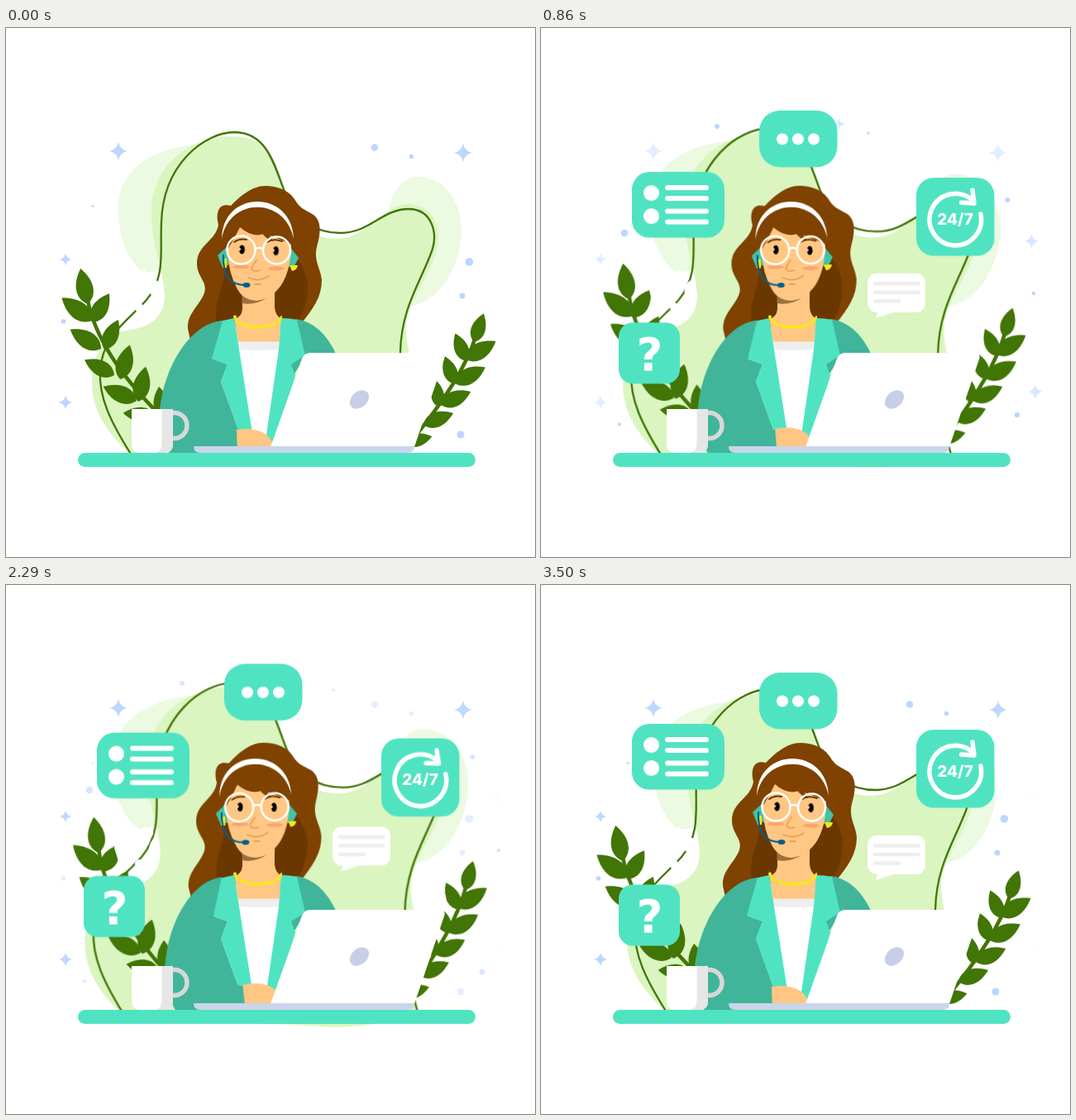
These frames come from a looping animation (640 by 640 pixels, 3.57 s). An HTML page without scripts:

```html
<!DOCTYPE html>
<html lang="en">
<head>
<meta charset="utf-8">
<title>Customer support</title>
<style>
  html, body { margin: 0; width: 100%; height: 100%; overflow: hidden; background: #fff; }
  svg { display: block; width: 100%; height: 100%; }
  text { font-family: Inter, "Open Sans", sans-serif; fill: #fff; text-anchor: middle; }
  .round { fill: none; stroke-linecap: round; stroke-linejoin: round; }
  .mint { fill: #50e3c2; }
  .jacket { fill: #40b59a; }
  .skin { fill: #ffc783; }
  .plant { fill: #417505; }
  .white { fill: #fff; }
  .stem { stroke: #417505; stroke-width: 4.5; }
  .blue { fill: #bbd6ff; }

  /* slow sway: one swing out and back per loop */
  .sway { animation: 1785ms cubic-bezier(.37, 0, .63, 1) infinite alternate; }
  .grow { animation-name: grow; transform-origin: 330px 330px; }
  .left { animation-name: left; transform-origin: 247px 519px; }
  .right { animation-name: right; transform-origin: 385px 548px; }
  .hair { animation-name: hair; transform-origin: 303px 325px; }
  .head { animation-name: head; transform-origin: 303px 350px; }
  .arm { animation-name: arm; transform-origin: 250px 370px; }
  .up { animation-name: up; }
  .down { animation-name: down; }
  @keyframes grow { to { transform: scale(1.046); } }
  @keyframes left { to { transform: rotate(4.8deg); } }
  @keyframes right { to { transform: rotate(-4.3deg); } }
  @keyframes hair { to { transform: rotate(-1.6deg); } }
  @keyframes head { to { transform: rotate(-2deg); } }
  @keyframes arm { to { transform: rotate(-4.6deg); } }
  @keyframes up { to { transform: translateY(-13px); } }
  @keyframes down { to { transform: translateY(13px); } }

  .twinkle { animation: fade 595ms cubic-bezier(.37, 0, .63, 1) infinite alternate; }
  .dots { animation: fade 892.5ms cubic-bezier(.37, 0, .63, 1) infinite alternate; }
  .late { animation-direction: alternate-reverse; }
  @keyframes fade { from { opacity: 1; } to { opacity: 0; } }

  /* cards pop in one after another and vanish when the loop restarts */
  .pop { animation: 3570ms ease-out infinite; }
  .note { animation-name: note; transform-origin: 408px 352px; }
  .hours { animation-name: hours; transform-origin: 454px 270px; }
  .list { animation-name: list; transform-origin: 222px 247px; }
  .chat { animation-name: chat; transform-origin: 311px 175px; }
  .ask { animation-name: ask; transform-origin: 168px 363px; }
  @keyframes note { 0% { transform: scale(0); } 15.4%, 100% { transform: none; } }
  @keyframes hours { 0%, 3.6% { transform: scale(0); } 19%, 100% { transform: none; } }
  @keyframes list { 0%, 6.3% { transform: scale(0); } 21.7%, 100% { transform: none; } }
  @keyframes chat { 0%, 6.7% { transform: scale(0); } 22.1%, 100% { transform: none; } }
  @keyframes ask { 0%, 8.7% { transform: scale(0); } 24.1%, 100% { transform: none; } }

  .spin { animation: spin 3570ms cubic-bezier(.37, 0, .63, 1) infinite; transform-origin: 501px 224.5px; }
  @keyframes spin { 0%, 33.6% { transform: rotate(0); } 65.5%, 100% { transform: rotate(360deg); } }

  .wag {
    font-family: "DejaVu Sans", sans-serif;
    animation: wag 3570ms ease-in-out infinite;
    transform-origin: 131px 400px;
  }
  @keyframes wag {
    0%, 30% { transform: rotate(0); }
    34% { transform: rotate(7deg); }
    39% { transform: rotate(-7deg); }
    45%, 100% { transform: rotate(0); }
  }

  .hop { animation: hop 3570ms ease-in-out infinite; }
  .hop:nth-of-type(2) { animation-delay: 200ms; }
  .hop:nth-of-type(3) { animation-delay: 400ms; }
  @keyframes hop {
    0%, 31.1%, 42.3%, 70.3%, 81.5%, 100% { transform: none; }
    36.7%, 75.9% { transform: translateY(-13px); }
  }

  .eye { animation: blink 3570ms linear infinite; transform-box: fill-box; transform-origin: center; }
  @keyframes blink {
    0%, 46%, 51.5%, 100% { transform: none; }
    49.3% { transform: scaleY(.15); }
  }
</style>
</head>
<body>
<svg viewBox="0 0 640 640" xmlns="http://www.w3.org/2000/svg">
  <defs>
    <path id="leaf" d="M0 0C-14 -9 -13.500 -27 0 -44C13.500 -27 14 -9 0 0Z"/>
    <path id="star" d="M0 -11Q1.8 -1.8 11 0Q1.8 1.8 0 11Q-1.8 1.8 -11 0Q-1.8 -1.8 0 -11Z"/>
    <g id="pupil">
      <ellipse rx="3.4" ry="5.6"/>
      <circle class="skin" cx="-3.4" cy="-.6" r="2"/>
    </g>
  </defs>

  <g class="blue">
    <g class="twinkle">
      <use href="#star" x="136" y="149"/>
      <use href="#star" x="553" y="151"/>
      <use href="#star" transform="translate(72 280) scale(.65)"/>
      <use href="#star" transform="translate(72 453) scale(.75)"/>
    </g>
    <g class="twinkle late">
      <use href="#star" transform="translate(360.5 116) scale(.65)"/>
      <use href="#star" transform="translate(593.5 258) scale(.8)"/>
      <use href="#star" transform="translate(598 440) scale(.8)"/>
    </g>
  </g>

  <!-- backdrop -->
  <g class="sway grow">
    <g fill="#ebfae0">
      <path d="M255 140C190 138 136 165 136 216C136 256 147 280 166 296L230 290Z"/>
      <path d="M463 218C468 195 482 180 499 180C532 181 551 212 551 245C550 290 522 334 488 336L470 260Z"/>
    </g>
    <path fill="#daf5c0" d="M156 520C120 490 104 460 104 430C104 392 122 370 145 366C174 363 192 350 192 323C190 290 176 265 176 222C177 160 230 131 272 131C318 131 326 160 340 203C352 240 370 255 400 255C440 254 455 213 487 213C516 214 527 240 522 265C515 298 486 330 484 362C484 380 488 390 490 410L490 506C460 528 400 529 370 526C300 523 250 520 156 520Z"/>
    <path class="round" stroke="#417505" stroke-width="2.3" d="M154 520C125 475 112 445 114 415C116 372 148 354 170 329C194 300 186 270 188 235C190 165 240 126 277 126C318 127 325 169 339 203C353 235 375 248 405 248C440 248 455 219 487 219C515 219 524 248 514 273C500 310 478 340 477 393C476 430 480 470 492 510"/>
  </g>

  <g class="blue">
    <g class="dots">
      <circle cx="446" cy="144.5" r="4.3"/>
      <circle cx="490.5" cy="155.5" r="2.8"/>
      <circle cx="560.5" cy="283" r="4.8"/>
      <circle cx="552" cy="324" r="3.5"/>
      <circle cx="550" cy="492" r="4.5"/>
      <circle cx="105" cy="215.5" r="1.6"/>
      <circle cx="69.5" cy="355" r="2.8"/>
    </g>
    <g class="dots late">
      <circle cx="213" cy="119" r="3"/>
      <circle cx="101" cy="248" r="4.3"/>
      <circle cx="396" cy="127" r="1.7"/>
      <circle cx="564.5" cy="208" r="2.9"/>
      <circle cx="596" cy="321" r="2.3"/>
      <circle cx="576" cy="468" r="3.2"/>
      <circle cx="95" cy="479.5" r="2"/>
    </g>
  </g>

  <!-- plants -->
  <g class="sway left plant">
    <path class="round stem" d="M99 330Q112 395 188 470"/>
    <use href="#leaf" transform="translate(99 334) rotate(-11.5)"/>
    <use href="#leaf" transform="translate(104 354) rotate(-53) scale(1.04)"/>
    <use href="#leaf" transform="translate(115 388) rotate(-58)"/>
    <use href="#leaf" transform="translate(131 420) rotate(-63) scale(.92)"/>
    <use href="#leaf" transform="translate(158 451) rotate(-67)"/>
    <use href="#leaf" transform="translate(181 470) rotate(-84) scale(.9)"/>
    <use href="#leaf" transform="translate(104 356) rotate(31) scale(.92)"/>
    <use href="#leaf" transform="translate(119 389) rotate(25) scale(.9)"/>
    <use href="#leaf" transform="translate(138 425) rotate(16) scale(.98)"/>
    <use href="#leaf" transform="translate(160 452) rotate(12) scale(.98)"/>
    <use href="#leaf" transform="translate(189 471) rotate(-6) scale(.85)"/>
  </g>
  <g class="sway right plant">
    <path class="round stem" d="M568 374Q552 425 490 500"/>
    <use href="#leaf" transform="translate(566 380) rotate(19) scale(.83)"/>
    <use href="#leaf" transform="translate(556 401) rotate(59) scale(.97)"/>
    <use href="#leaf" transform="translate(543 430) rotate(62) scale(.95)"/>
    <use href="#leaf" transform="translate(526 456) rotate(66) scale(.9)"/>
    <use href="#leaf" transform="translate(505 480) rotate(69) scale(.88)"/>
    <use href="#leaf" transform="translate(482 502) rotate(77) scale(.78)"/>
    <use href="#leaf" transform="translate(557 403) rotate(-22) scale(.82)"/>
    <use href="#leaf" transform="translate(543 431) rotate(-20) scale(.82)"/>
    <use href="#leaf" transform="translate(524 459) rotate(-7) scale(.76)"/>
  </g>
  <g class="white">
    <path d="M131 318Q138 297 152 296L157 290L162 297L169 291L168 302Q160 322 150 342Q134 346 135 331Z"/>
    <ellipse cx="179" cy="314" rx="4.5" ry="9" transform="rotate(25 179 314)"/>
    <ellipse cx="161" cy="338" rx="5" ry="6"/>
    <circle cx="174" cy="300" r="4"/>
    <path d="M513 395Q514 372 528 361Q533 366 530 372Q535 378 530 395Z"/>
  </g>

  <!-- woman -->
  <g class="sway hair">
    <path fill="#7f4200" d="M272 215C258 211 253 222 257 238C254 258 231 262 231 285C231 302 246 308 239 323C232 338 219 346 220 364L224 382L290 356L335 356L355 360C372 340 382 325 382 305C381 291 372 282 376 265C381 248 382 234 372 226C361 219 356 219 349 207C340 194 325 191 314 191C297 191 283 204 272 215Z"/>
    <path fill="#6b3700" d="M264 285C268 310 250 325 255 358H290V300ZM352 280C370 300 367 330 355 352L320 356L330 300Z"/>
  </g>
  <path class="skin" d="M286 310V340Q285 350 276 352L282 384H330L334 352Q326 349 325 338V310Z"/>
  <path fill="#99703f" d="M285.5 321Q300 332 315 327Q300 336 285.5 333Z"/>
  <path class="jacket" d="M350 352Q382 356 400 396L360 400L330 450L340 400Z"/>
  <path class="white" d="M279 380H332L314 507H298Z"/>
  <path fill="#eee" d="M279 379.5H331.5L330.5 389Q306 391 282 389Z"/>
  <path class="jacket" d="M258 355L249 400L268 407L260 428L281 486V513H215V400Z"/>
  <path class="mint" d="M276 351L258 355L249 400L268 407L260 428L281 486L298 490L282 389ZM333 351Q343 351 352 353L362 396L345 407L350 420L330 506H313L330 389Z"/>
  <path class="round" stroke="#f8e71c" stroke-width="4" stroke-dasharray=".1 4" d="M277 349.5C281 366 329 366 333 349.5"/>
  <path class="round" stroke="#f8e71c" stroke-width="2.5" d="M277 349.5C281 366 329 366 333 349.5"/>
  <g class="sway arm">
    <path class="skin" d="M276 487Q296 482 312 490Q322 496 324 507V513H278Z"/>
    <path class="jacket" d="M262 354C222 357 190 412 186 465Q188 500 198 515H280L279 487L272 486L256 435L249 400Z"/>
  </g>

  <g class="sway head">
    <path fill="#40c4a5" d="M268 264L256 275L262 290L270 286ZM342 263L354 278L348 290L340 288Z"/>
    <path fill="#f8e71c" d="M262 279H267V290H262ZM343 287L353 287Q352 293 346 294Z"/>
    <path class="skin" d="M268 268Q277 254 283 241Q298 254 312 249Q328 253 345 262Q345 292 333 311Q321 328 303 330Q287 329 280 316Q269 297 268 268Z"/>
    <path class="white" d="M261 255C262 195 346 195 348 255C338 204 270 204 261 255Z"/>
    <path fill="#7f4200" d="M309 247Q314 255 323 258Q321 252 317 249Z"/>
    <g fill="#f9a66c">
      <ellipse cx="284.5" cy="289" rx="10" ry="2.6"/>
      <ellipse cx="327" cy="291" rx="10" ry="2.6"/>
    </g>
    <path class="round" stroke="#6b3700" stroke-width="2" d="M276 259Q283 254 291 256M316 259Q323 254 334 258"/>
    <path class="round" stroke="#e8a258" stroke-width="1.8" d="M303 281Q298 288 297 291Q300 296 307 293M293 302Q306 308 318 300M301 310H308"/>
    <g transform="translate(285.5 268)"><use class="eye" href="#pupil"/></g>
    <g transform="translate(326.5 269.5)"><use class="eye" href="#pupil"/></g>
    <g class="round" stroke="#fff" stroke-width="2.5">
      <circle cx="284.5" cy="268.5" r="17"/>
      <circle cx="327.5" cy="269" r="16.5"/>
      <path d="M302 267Q306 265 310 267"/>
    </g>
    <path class="round" stroke="#005f87" stroke-width="2.2" d="M263 275C262 300 271 311 290 311"/>
    <ellipse cx="291" cy="311" rx="4.5" ry="3" fill="#005f87"/>
  </g>

  <!-- desk -->
  <path class="white" d="M320 507L358 400Q361 393 368 393H523Q533 393 530 401L494 507Z"/>
  <ellipse cx="427.5" cy="449.5" rx="13" ry="9.5" fill="#c7cfe8" transform="rotate(-42 427.5 449.5)"/>
  <path fill="#c9d5ec" d="M227 506H494Q494 514 486 514H235Q227 514 227 506Z"/>
  <circle cx="203.5" cy="481" r="15.5" fill="none" stroke="#d8d8d8" stroke-width="5.5"/>
  <path class="white" d="M152 461H202V503Q202 514 191 514H163Q152 514 152 503Z"/>
  <path fill="#e6e6e6" d="M188.500 461H202V503Q202 514 191 514H180Q188.500 513 188.500 503Z"/>
  <rect class="mint" x="87" y="514" width="481" height="17" rx="8.5"/>

  <!-- cards -->
  <g class="sway up"><g class="pop note">
    <rect class="white" x="395" y="303" width="70" height="47" rx="11"/>
    <path class="white" d="M409 346L405 357L430 349Z"/>
    <path class="round" stroke="#eee" stroke-width="4.5" d="M404 315.500H456.500M404 326H456.500M404 336.500H433"/>
  </g></g>
  <g class="sway down"><g class="pop hours">
    <rect class="mint" x="454" y="175" width="94.5" height="94.5" rx="21"/>
    <path class="round spin" stroke="#fff" stroke-width="5.5" d="M532 219A31.300 31.300 0 1 1 522 202M522 190L524 206L508.500 205"/>
    <text x="501" y="231.5" font-size="19" font-weight="800">24/7</text>
  </g></g>
  <g class="sway down"><g class="pop list">
    <rect class="mint" x="110" y="168" width="112" height="79.5" rx="21"/>
    <circle class="white" cx="133.5" cy="193.5" r="9.5"/>
    <circle class="white" cx="133.5" cy="221.5" r="9.5"/>
    <path class="round" stroke="#fff" stroke-width="5.8" d="M153 187H200M153 200H200M153 215.500H200M153 228.500H200"/>
  </g></g>
  <g class="sway up"><g class="pop chat">
    <rect class="mint" x="264" y="106" width="94.5" height="68.5" rx="25"/>
    <circle class="white hop" cx="292" cy="140.5" r="7"/>
    <circle class="white hop" cx="311" cy="140.5" r="7"/>
    <circle class="white hop" cx="330" cy="140.5" r="7"/>
  </g></g>
  <g class="sway up"><g class="pop ask">
    <rect class="mint" x="94" y="362.5" width="74" height="74" rx="17"/>
    <text class="wag" x="131.5" y="420.5" font-size="55" font-weight="700">?</text>
  </g></g>
</svg>
</body>
</html>
```
